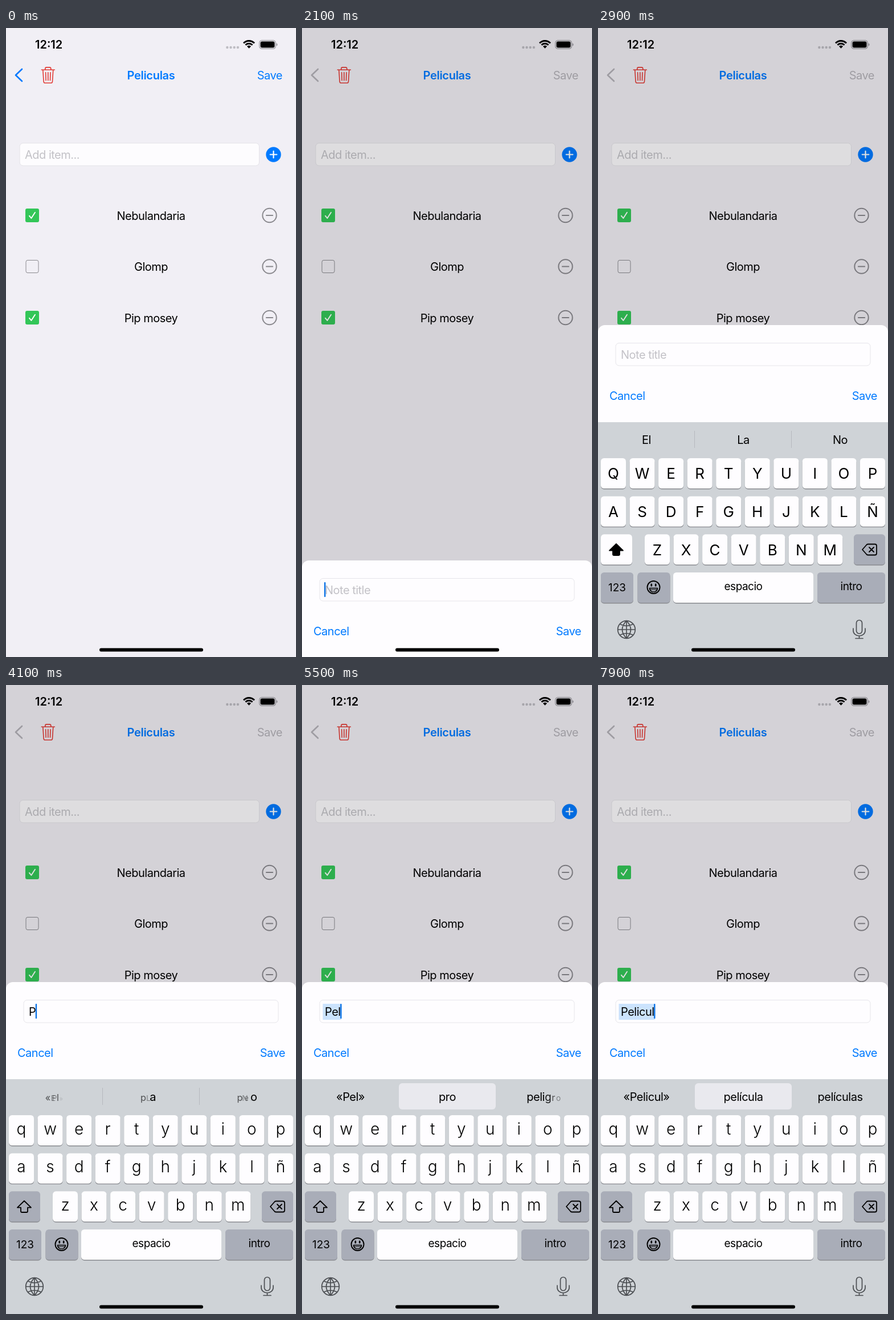
Recreate the animation shown at these times as an HTML page with a canvas. Size 509 by 1101 pixels, loop 8 s.

```html
<!DOCTYPE html>
<html lang="es">
<head>
<meta charset="utf-8">
<title>Lista</title>
<style>
  html, body { margin: 0; height: 100%; overflow: hidden; background: #f1eff5; }
  canvas { display: block; }
</style>
</head>
<body>
<canvas id="stage" width="509" height="1101"></canvas>
<script>
const W = 509, H = 1101, LOOP = 8000, STEP = 100;
const BLUE = '#007aff', GRAY = '#8a898e', HINT = '#c3c2c7', INK = '#000', ICON = '#4b4e52';
const ctx = document.getElementById('stage').getContext('2d');
const clamp = v => Math.max(0, Math.min(1, v));
const mix = (a, b, p) => a + (b - a) * p;
// Critically damped spring, from 0 to 1
const spring = ms => ms <= 0 ? 0 : 1 - (1 + ms * .017) * Math.exp(-ms * .017);

// Time of each key press, text so far, middle and right suggestion
const typed = [
  [0, '', 'La', 'No'],
  [4000, 'P', 'para', 'pero'],
  [4600, 'Pe', 'pero', 'peli'],
  [5300, 'Pel', 'pro', 'peligro'],
  [6000, 'Peli', 'peligro', 'película'],
  [6620, 'Pelic', 'película', 'películas'],
  [7100, 'Pelicu', 'película', 'películas'],
  [7500, 'Pelicul', 'película', 'películas']
];
const FIRST_CORRECTION = 3;

function font(size, weight = 400, spacing = -.5) {
  ctx.font = `${weight} ${size}px Inter, sans-serif`;
  ctx.letterSpacing = spacing + 'px';
}

// y is the middle of the capitals
function text(str, x, y, { color = INK, align = 'left', size = 20, weight = 400, spacing = -.5 } = {}) {
  font(size, weight, spacing);
  ctx.fillStyle = color;
  ctx.textAlign = align;
  ctx.fillText(str, x, y + size * .364);
}

function box(x, y, w, h, r, fill, stroke, line = 1) {
  ctx.beginPath();
  ctx.roundRect(x, y, w, h, r);
  if (fill) { ctx.fillStyle = fill; ctx.fill(); }
  if (stroke) { ctx.strokeStyle = stroke; ctx.lineWidth = line; ctx.stroke(); }
}

function disc(x, y, r, fill) {
  ctx.beginPath();
  ctx.arc(x, y, r, 0, Math.PI * 2);
  ctx.fillStyle = fill;
  ctx.fill();
}

function draw(d, x, y, { stroke, fill, line = 2 }) {
  const path = new Path2D(d);
  ctx.save();
  ctx.translate(x, y);
  ctx.lineCap = ctx.lineJoin = 'round';
  if (fill) { ctx.fillStyle = fill; ctx.fill(path); }
  if (stroke) { ctx.strokeStyle = stroke; ctx.lineWidth = line; ctx.stroke(path); }
  ctx.restore();
}

const ring = r => `M${r} 0A${r} ${r} 0 1 1 ${-r} 0A${r} ${r} 0 1 1 ${r} 0Z`;

function statusBar() {
  text('12:12', 51, 29, { weight: 600, spacing: 0 });
  for (let i = 0; i < 4; i++) disc(388.3 + i * 6.2, 34, 2.2, '#bebdc3');
  ctx.strokeStyle = INK;
  ctx.lineCap = 'butt';
  ctx.lineWidth = 2.9;
  for (const r of [13, 8.3]) {
    ctx.beginPath();
    ctx.arc(426.5, 35.5, r, -Math.PI * .76, -Math.PI * .24);
    ctx.stroke();
  }
  draw('M0 0L-3.6 -3.8Q0 -6.8 3.6 -3.8Z', 426.5, 35.7, { fill: INK });
  box(444.6, 21.6, 28.8, 14.8, 4.8, null, '#9c9ba1', 1.2);
  box(446.5, 23.5, 25, 11, 3, INK);
  draw('M0 -2.6Q2 -2 2 0Q2 2 0 2.6Z', 474.6, 29, { fill: '#9c9ba1' });
}

function listScreen(dim) {
  ctx.fillStyle = '#f1eff5';
  ctx.fillRect(0, 0, W, H);
  statusBar();

  const tint = `rgb(${mix(0, 180, dim)} ${mix(122, 178, dim)} ${mix(255, 184, dim)})`;
  draw('M11 -10.5L0 0L11 10.5', 17, 82.5, { stroke: tint, line: 2.6 });
  draw('M-11.5 -9.5H11.5M-5 -9.5V-11.5Q-5 -13.8 -2.7 -13.8H2.7Q5 -13.8 5 -11.5V-9.5' +
    'M-9 -9.5L-7.7 11Q-7.5 13.6 -5 13.6H5Q7.5 13.6 7.7 11L9 -9.5' +
    'M-4.2 -5L-3.7 9M0 -5V9M4.2 -5L3.7 9', 73.8, 82.7, { stroke: '#e23b35', line: 1.6 });
  text('Peliculas', 254.5, 83, { color: BLUE, align: 'center', weight: 600, spacing: -.3 });
  text('Save', 485, 83, { color: tint, align: 'right' });

  box(24, 201.5, 420.5, 39.5, 6, '#fdfcfe', '#e4e3e8');
  text('Add item...', 33, 222, { color: HINT });
  disc(469.5, 221.5, 13.2, BLUE);
  draw('M-5.8 0H5.8M0 -5.8V5.8', 469.5, 221.5, { stroke: '#fff', line: 2.2 });

  ['Nebulandaria', 'Glomp', 'Pip mosey'].forEach((name, i) => {
    const y = 328 + i * 89.5;
    if (i === 1) {
      box(35, y - 11, 22, 22, 3, null, GRAY);
    } else {
      box(34, y - 12, 24, 24, 3, '#33c658');
      draw('M-5 .8L-1.6 5L5 -5.2', 46, y, { stroke: '#fff', line: 1.9 });
    }
    text(name, 254.5, y + .5, { align: 'center' });
    draw(ring(12.2) + 'M-5.6 0H5.6', 462.5, y, { stroke: GRAY });
  });

  ctx.fillStyle = `rgba(0,0,0,${.12 * dim})`;
  ctx.fillRect(0, 0, W, H);
}

function sheet(y, t, value, marked) {
  box(0, y, W, H - y + 20, [12, 12, 0, 0], '#fefdff');
  box(31, y + 31.5, 447, 39.5, 6, '#fefdff', '#e6e5ea');
  font(20);
  const end = 39.5 + (value ? ctx.measureText(value).width + .5 : 0);
  if (marked) box(36.5, y + 38, end - 35, 28, 0, '#cbe3fd');
  text(value || 'Note title', 40, y + 52, { color: value ? INK : HINT });

  const phase = t % 1000;
  const blink = phase < 600 ? clamp((600 - phase) / 200) : clamp((phase - 900) / 100);
  ctx.globalAlpha = value ? 1 : blink;
  box(end - .5, y + 38, 2.4, 26, 1, '#0a72e6');
  ctx.globalAlpha = 1;

  text('Cancel', 20, y + 124, { color: BLUE });
  text('Save', 490, y + 124, { color: BLUE, align: 'right' });
}

// Shared letters slide, the others shrink or grow one after another
function morph(from, to, x, y, age) {
  if (from === to || age > 300) return text(to, x, y, { align: 'center' });
  font(20);
  const place = word => {
    const left = x - ctx.measureText(word).width / 2;
    return [...word].map((c, i) => left + ctx.measureText(word.slice(0, i + 1)).width - ctx.measureText(c).width / 2);
  };
  const glyph = (c, cx, p) => {
    if (p <= 0) return;
    ctx.save();
    ctx.globalAlpha = p;
    ctx.translate(cx, y + 7.3);
    ctx.scale(.5 + p / 2, .5 + p / 2);
    text(c, 0, -7.3, { align: 'center' });
    ctx.restore();
  };
  const progress = i => clamp((age - 50 - i * 20) / 80);
  const oldX = place(from), newX = place(to), kept = new Set();
  let next = 0;
  [...to].forEach((c, i) => {
    const j = from.indexOf(c, next);
    if (j < 0) return glyph(c, newX[i], progress(i));
    kept.add(j);
    next = j + 1;
    glyph(c, mix(oldX[j], newX[i], clamp((age - 50) / 150)), 1);
  });
  [...from].forEach((c, j) => kept.has(j) || glyph(c, oldX[j], 1 - progress(j)));
}

function key(x, y, w, fill = '#fefdff') {
  box(x, y + 1.4, w, 53, 5.5, '#898b90');
  box(x, y, w, 53, 5.5, fill);
}

function keyboard(y, index, age) {
  const DARK = '#a9adb8', upper = index === 0;
  ctx.save();
  ctx.translate(0, y);
  ctx.fillStyle = '#cfd3d7';
  ctx.fillRect(0, 0, W, H);

  if (index >= FIRST_CORRECTION) box(170, 7, 170, 46, 6, '#e9e9ee');
  else for (const x of [169, 339]) box(x, 15, 1, 30, 0, '#b6b9be');
  const words = i => {
    const [, value, middle, right] = typed[i];
    return [value ? `«${value}»` : 'El', middle, right];
  };
  const before = words(Math.max(0, index - 1));
  words(index).forEach((word, i) => morph(before[i], word, 85 + i * 170, 30.5, age));

  [['QWERTYUIOP', 5, 63], ['ASDFGHJKLÑ', 5, 129.7], ['ZXCVBNM', 82, 196.3]].forEach(([row, left, top]) => {
    [...row].forEach((c, i) => {
      const x = left + i * 50.55;
      key(x, top, 44);
      const style = upper ? { size: 26 } : { size: 28, weight: 300 };
      text(upper ? c : c.toLowerCase(), x + 22, top + (upper ? 27 : 23.6), { ...style, align: 'center', spacing: 0 });
    });
  });

  key(5, 196.3, 55, upper ? '#fefdff' : DARK);
  draw('M0 -10.5L12 1.2H6V7.5Q6 9.5 4 9.5H-4Q-6 9.5 -6 7.5V1.2H-12Z', 32, 223.5,
    { stroke: INK, fill: upper && INK, line: 1.8 });
  key(449, 196.3, 55, DARK);
  draw('M-12.5 0L-5 -8.5Q-4 -9.5 -2.5 -9.5H9.5Q12.5 -9.5 12.5 -6.5V6.5Q12.5 9.5 9.5 9.5H-2.5Q-4 9.5 -5 8.5Z' +
    'M-.5 -4L7.5 4M7.5 -4L-.5 4', 476.5, 223, { stroke: INK, line: 1.8 });

  key(5, 263, 57, DARK);
  text('123', 33.5, 289, { align: 'center', size: 19, spacing: 0 });
  key(69.5, 263, 57, DARK);
  draw(ring(11), 97.5, 289, { stroke: INK, line: 1.9 });
  draw('M-7 1.5H7Q6 8 0 8Q-6 8 -7 1.5Z', 97.5, 289, { stroke: INK, line: 1.6 });
  draw('M-7 4H7', 97.5, 289, { stroke: INK, line: 1 });
  for (const x of [93.8, 101.2]) draw('M0 -1.2V1.2', x, 285, { stroke: INK, line: 2.6 });
  key(132, 263, 246);
  text('espacio', 255, 287.5, { align: 'center', size: 19 });
  key(385, 263, 119, DARK);
  text('intro', 444.5, 287.5, { align: 'center', size: 19 });

  draw(ring(15.3) + 'M0 -15.3V15.3M-15.3 0H15.3M0 -15.3Q-15 0 0 15.3Q15 0 0 -15.3' +
    'M-11.5 -9.5Q0 -3.5 11.5 -9.5M-11.5 9.5Q0 3.5 11.5 9.5', 50, 363, { stroke: ICON, line: 1.7 });
  draw('M-5 -11.5A5 5 0 0 1 5 -11.5V2A5 5 0 0 1 -5 2ZM-10.5 -2V2A10.5 9 0 0 0 10.5 2V-2M0 11V15.5M-6.5 15.5H6.5',
    458.5, 363, { stroke: ICON, line: 1.7 });
  ctx.restore();
}

function render(t) {
  const open = spring(t - 430), lift = spring(t - 2110);
  const index = typed.findLastIndex(([start]) => t >= start);
  const [start, value] = typed[index];
  const age = t - start;
  listScreen(open);
  if (open) sheet(H - 169 * open - 412 * lift, t, value, index >= FIRST_CORRECTION && age >= 200);
  if (lift) keyboard(H - 411 * lift, index, age);
  box(164, 1085.5, 182, 6, 3, INK);
}

function tick() {
  render(Math.floor(performance.now() % LOOP / STEP) * STEP);
  requestAnimationFrame(tick);
}
tick();
</script>
</body>
</html>
```
